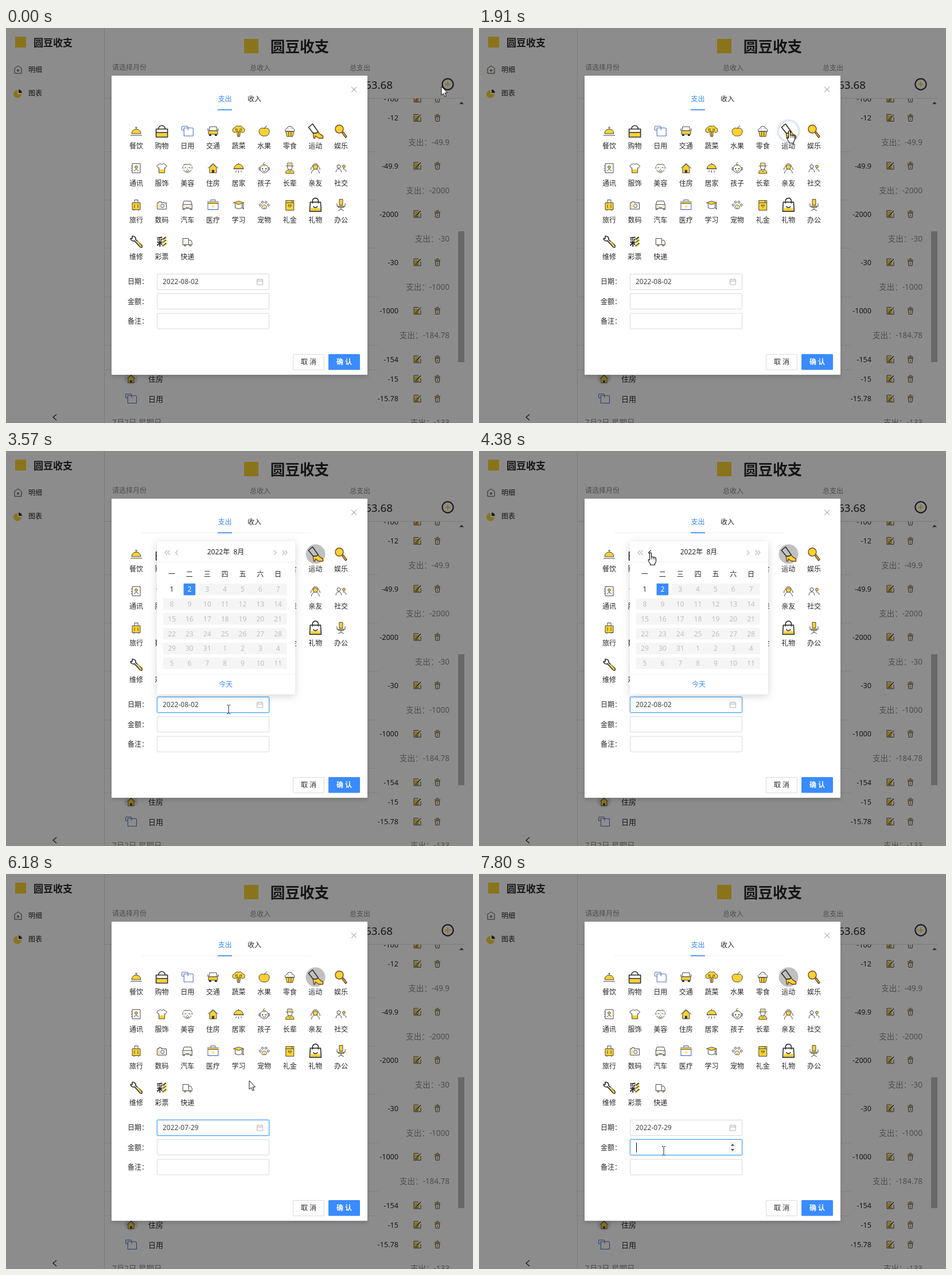
An HTML page that plays this animation: 814x688 px, repeating every 8 s.

```html
<!DOCTYPE html>
<html lang="zh-CN">
<head>
<meta charset="utf-8">
<style>
html, body { margin: 0; width: 100%; height: 100%; overflow: hidden; background: #8c8c8c; }
svg { display: block; font-family: "Noto Sans", "Noto Sans CJK SC", "Noto Sans CJK", sans-serif; }
.modal { filter: drop-shadow(0 4px 3px rgba(0,0,0,.13)); }
.popup { filter: drop-shadow(0 3px 7px rgba(0,0,0,.16)); }
</style>
</head>
<body>
<svg id="stage" width="814" height="688" viewBox="0 0 814 688"></svg>
<script>
const BLUE = '#3a8bff', INK = '#262626', PALE = '#bfbfbf', YELLOW = '#fbd231';
const LOOP = 8000;

const text = (x, y, s, size = 12, fill = INK, anchor = 'start', weight = 400) =>
  `<text x="${x}" y="${y + size * .37}" font-size="${size}" fill="${fill}" text-anchor="${anchor}" font-weight="${weight}">${s}</text>`;
const rect = (x, y, w, h, fill, more = '') =>
  `<rect x="${x}" y="${y}" width="${w}" height="${h}" fill="${fill}" ${more}/>`;
const path = (d, stroke, width = 1, fill = 'none') =>
  `<path d="${d}" stroke="${stroke}" stroke-width="${width}" fill="${fill}" stroke-linejoin="round"/>`;
const ring = (x, y, r) => `M${x - r} ${y}a${r} ${r} 0 1 0 ${2 * r} 0a${r} ${r} 0 1 0 ${-2 * r} 0`;

// The first letter of each icon part picks its style: stroke, fill, width
const styles = {
  s: ['#444', 'none', 1], t: ['#2c2c2c', 'none', 1.6], y: ['#444', YELLOW, 1],
  Y: ['none', YELLOW, 0], k: ['none', '#333', 0], b: ['#4f6fc0', '#fff', 1.1],
  o: ['#6b4322', YELLOW, 1.4], n: ['#5a4630', 'none', 1]
};
const icon = (x, y, parts, scale = 1) => `<g transform="translate(${x} ${y}) scale(${scale})">` +
  parts.split('|').map(p => {
    const [stroke, fill, width] = styles[p[0]];
    return path(p.slice(1), stroke, width, fill);
  }).join('') + '</g>';

const roll = 'bM-9-9H-1Q1-9 1-6H8Q10-6 10-4V8H-6V-2H-9Q-10-2-10-5Q-10-9-9-9Z|bM-6-2V-6H1M1-6V-2|YM-8-6h1v2h-1z';
const house = 'yM-6-1V8H6V-1L0-7Z|sM-9 0L0-8L9 0|kM-2 8V3H2V8Z';
const edit = 'YM-5-4H3V5H-5Z|sM2-6H-6V6H6V-1|sM-3 3L6-6M-4 4h5M-1 2L6-5';
const trash = 'YM-4-2H4V0H-4Z|nM-4-2H4L3 6H-3ZM-5-4H5M-2-6H2M0 1V4';

const items = [
  ['餐饮', 'yM-8 4A8 8 0 0 1 8 4Z|sM-10 7H10M0-4V-7M-2-7H2'],
  ['购物', 'YM-9 2H9V9H-9Z|tM-10-4H10V10H-10ZM-6-4Q-5-10 0-10Q5-10 6-4M-10 2H10'],
  ['日用', roll],
  ['交通', 'sM-6-8H6L7-1H-7ZM-9-5v4M9-5v4|yM-8-1H8V5H-8Z|kM-7 5h4v3h-4zM3 5h4v3H3z'],
  ['蔬菜', 'yM0-9A5 5 0 0 1 7-6A4 4 0 0 1 6 2L3 0L2 9H-2L-3 0L-6 2A4 4 0 0 1-7-6A5 5 0 0 1 0-9Z|sM-3-5Q-3-1 0 2Q3-1 3-5M0 2V9M-5-5v4M5-5v4'],
  ['水果', 'yM0-5C4-7 9-5 9 0C9 5 5 9 0 8C-5 9-9 5-9 0C-9-5-4-7 0-5Z|sM0-5Q1-8 5-10'],
  ['零食', 'yM-7 0H7L5 9H-5Z|sM-8 0Q-9-4-5-5Q-4-9 0-9Q4-9 5-5Q9-4 8 0ZM-2 0V9M2 0V9M-3-4h1M2-5h1'],
  ['运动', 'oM-4 3Q2 4 5 1Q7 5 12 7Q14 9 13 12H6L0 8L-1 12H-3Z|tM-12-7L-5-13L5 1Q2 4-4 3Z'],
  ['娱乐', 'o' + ring(-3, -4, 7) + '|oM2 3L4 1L10 9L8 11Z'],
  ['通讯', 'sM-7-8H7V8H-7Z|y' + ring(0, -2, 2.3) + '|sM-4 5Q0-1 4 5M-9-4h2M-9 0h2M-9 4h2'],
  ['服饰', 'YM-5 2H5V8H-5Z|sM-3-8Q0-5 3-8L9-4L6 0L5-1V8H-5V-1L-6 0L-9-4Z'],
  ['美容', 'sM-7-4Q-5-9 0-6Q5-9 7-4M-7 3Q0 12 7 3M-8-3V1M8-3V1M-3 4Q0 7 3 4M-5-1h3M2-1h3M-1 2h2|YM-6 1h2v1h-2zM4 1h2v1H4z'],
  ['住房', house],
  ['居家', 'yM-8 1A8 8 0 0 1 8 1Z|sM0-7V-9M-9 1H9M-4 4l-1 3M4 4l1 3M0 4v4'],
  ['孩子', 's' + ring(0, 1, 7) + 'M-7-1h-2v4h2M7-1h2v4h-2M-3 4Q0 7 3 4M0-6Q-3-9 1-10|kM-4 0h2v2h-2zM2 0h2v2H2z|YM-2-5h4v2h-4z'],
  ['长辈', 'sM-7-4H7M-4-4V-9H4V-4M-4-4V0Q0 5 4 0V-4|YM-4-7h8v2h-8z|yM-7 9V6L-3 2L0 6L3 2L7 6V9Z'],
  ['亲友', 'y' + ring(0, -2, 4) + '|sM-7 9Q-6 3-2 2M7 9Q6 3 2 2M-8 3Q-8-2-5-3A5 5 0 0 1 5-3Q8-2 8 3'],
  ['社交', 's' + ring(-4, -3, 3) + 'M-9 7Q-8 1-4 1Q0 1 1 7M3 1Q8 1 9 6|y' + ring(5, -3, 2.3)],
  ['旅行', 'yM-7-4H7V8H-7Z|sM-3-4V-9H3V-4M-3-1V5M3-1V5M-4 8v2M4 8v2'],
  ['数码', 'sM-8-4H-5V-6H-1V-4H8V7H-8ZM5-2h1' + ring(1, 1.5, 3) + '|YM-6-2h2v7h-2z'],
  ['汽车', 'sM-6-7H6L8-1V6H-8V-1ZM-8-1H8M-8 6v2h3v-2M5 6v2h3v-2M-3 4H3|YM-6 1h2v2h-2zM4 1h2v2H4z'],
  ['医疗', 'bM-9-6H9V8H-9ZM-4-6V-9H4V-6|YM-9-6H9V-3H-9ZM-3 2H3V3H-3ZM-.5 0H.5V5H-.5Z|sM-9-3H9'],
  ['学习', 'yM-9-4L0-7L9-4L0-1Z|sM-6-2V5Q0 8 6 5V-2M8-4V6|kM7 5h2v2H7z'],
  ['宠物', 'YM-2 3Q0 1 2 3L2 6H-2Z|sM-4 5Q-4 0 0 0Q4 0 4 5Q3 8 0 6Q-3 8-4 5Z' + [[-7, 0], [-3, -5], [3, -5], [7, 0]].map(p => ring(...p, 1.8)).join('')],
  ['礼金', 'yM-7-8H7V9H-7Z|sM-7-4H7M4-8v4M-3 0Q0 7 3 0Z'],
  ['礼物', 'YM-8 5H8L9 10H-9Z|tM-9-5H9L10 11H-10ZM-5-3V-8Q-4-12 0-12Q4-12 5-8V-3M-4 2Q0 7 4 2'],
  ['办公', 'yM-3-10H3V0H-3Z|yM-5 2H5V4H-5Z|sM0 4V8M-5 10L0 7L5 10M-7-3V2h2M7-3V2H5'],
  ['维修', 'tM-10-6A5 5 0 0 0-3-2L7 9Q11 11 10 6L-1-4A5 5 0 0 0-7-10V-6Z|YM1 0L3-1L9 6L8 9L6 7Z'],
  ['彩票', 'YM0 0Z'],
  ['快递', 'sM-8-6H2V5H-8ZM2-3H6L8 1V5H2|y' + ring(-4, 6, 1.5) + '|y' + ring(5, 6, 1.5)]
];

function page() {
  const grey = '#8c8c8c', black = INK;
  let s = rect(0, 0, 814, 688, '#fff');
  for (const y of [215.5, 299.5, 383.5, 468.5, 552.5, 595.5]) s += path(`M172 ${y}H648`, '#e6e6e6');
  [[123, -100], [156.5, -12], [240, -49.9], [324, -2000], [408, -30], [492.5, -1000], [577, -154], [611, -15], [645.5, -15.78]]
    .forEach(([y, n]) => s += text(684, y, n, 12.6, black, 'end') + icon(717, y, edit) + icon(752, y, trash));
  [-49.9, -2000, -30, -1000, -184.78, -133]
    .forEach((n, i) => s += text(773, i < 5 ? 199 + i * 84 : 687.5, '支出：' + n, 13.5, grey, 'end'));
  s += `<ellipse cx="218" cy="611" rx="12" ry="10" fill="#e2e7e2"/>` + icon(218, 611, house, .85) + text(248, 611, '住房', 13)
    + icon(218, 646, roll, .95) + text(248, 646, '日用', 13) + text(185, 687.5, '7月2日 星期日', 13.5, grey)
    + rect(172, 0, 642, 122, '#fff') + path('M171.5 0V688M171 122.5H800', '#dedede')
    + rect(788, 354, 11, 228, '#bcbcbc') + path('M790 132.5h8l-4-4z', 'none', 0, '#505050')
    + rect(16, 15, 19, 19, YELLOW) + text(48, 25.5, '圆豆收支', 17, black, 'start', 700)
    + rect(415, 19, 25, 25, YELLOW) + text(512, 32.5, '圆豆收支', 25.6, black, 'middle', 700)
    + icon(21, 73, 'sM-6-3L0-7L6-3V6H-6Z|y' + ring(0, 1, 1.5)) + text(39, 72.5, '明细')
    + icon(21, 114, 'YM-1-6A7 7 0 1 0 6 1H-1Z|kM1-7A7 7 0 0 1 7-1H1Z') + text(39, 114, '图表')
    + text(185, 69, '请选择月份', 12, grey) + text(425, 69.5, '总收入', 12, grey) + text(599, 69.5, '总支出', 12, grey)
    + text(674, 99, '63.68', 18.8, black, 'end')
    + path(ring(770, 98, 9.6), '#333', 2.2) + path('M770 93.500v9M765.500 98h9', YELLOW, 2)
    + path('M88 673l-6 5l6 5', '#222', 1.2);
  return s + rect(0, 0, 814, 688, 'rgba(0,0,0,.45)');
}

function modal() {
  let s = rect(184, 83, 446, 521, '#fff', 'class="modal" rx="1"')
    + path('M602 102.5l9 9m0-9l-9 9', '#858585', 1)
    + '<path id="tabLine" d="M236 142.5H531" stroke="#f0f0f0"/>'
    + text(381.5, 124, '支出', 12, BLUE, 'middle') + text(433, 124, '收入', 12, INK, 'middle') + rect(369, 141.5, 25, 1.8, BLUE)
    + '<circle id="spot" cx="539.5" cy="179.5"/>';
  items.forEach(([name, art], i) => {
    const x = 227 + i % 9 * 44.62, y = 180 + Math.floor(i / 9) * 64.2;
    s += icon(x, y, art) + text(x, y + 26, name, 12, INK, 'middle');
    if (name == '彩票') s += text(x, y, '彩', 18, '#333', 'middle', 700) + path(`M${x + 8} ${y - 7}l-6 5m7-1l-8 6m8 0l-8 6`, YELLOW, 1.8);
  });
  ['日期：', '金额：', '备注：'].forEach((label, i) => s += text(212, 442 + i * 34.4, label));
  return s + rect(500.5, 568.5, 54, 27, '#fff', 'stroke="#d9d9d9" rx="1.5"') + text(527.5, 582, '取 消', 12, INK, 'middle')
    + rect(562, 568, 55, 27.5, BLUE, 'rx="1.5"') + text(589.5, 582, '确 认', 12, '#fff', 'middle', 600);
}

// start, end, steps, control point, end point
const moves = [
  [560, 1340, 7, 600, 244, 541, 179],
  [2600, 3170, 5, 440, 590, 388, 450],
  [3710, 4380, 6, 330, 300, 299, 177],
  [4790, 5510, 6, 340, 290, 420, 350],
  [5900, 6040, 2, 422, 355, 424, 360],
  [6330, 6720, 4, 360, 400, 322, 482]
];

function pointer(t) {
  let x = 759, y = 102;
  for (const [start, end, n, cx, cy, ex, ey] of moves) {
    if (t < start) break;
    const k = Math.min(1, (Math.floor((t - start) * (n - 1) / (end - start) + .02) + 1) / n);
    const u = k * k * (3 - 2 * k), v = 1 - u;
    x = v * v * x + 2 * u * v * cx + u * u * ex;
    y = v * v * y + 2 * u * v * cy + u * u * ey;
  }
  return [x, y];
}

const cursors = {
  arrow: path('M0 0V15L3.5 12L6 17.5L8.2 16.5L6 11H10.5Z', '#111', 1, '#fff'),
  hand: path('M-1.5 1Q0-.8 1.5 1V8Q3 6.5 4.5 8Q6 7 7.2 8.6Q9 8 9.5 10V15Q9 18 7.5 19V21.5H-.5V19.5Q-3.5 16-4 13Q-4 11-1.5 13Z', '#111', 1.1, '#fff')
    + path('M1.5 8v4M4.5 8v4M7.2 9v3', '#111', .8),
  beam: path('M-3-7.500H-1L0-6.500L1-7.500H3M0-6.500V6.500M-3 7.500H-1L0 6.500L1 7.500H3', '#222', 1)
};

const iso = d => [d.getFullYear(), d.getMonth() + 1, d.getDate()].map(n => String(n).padStart(2, '0')).join('-');
const today = new Date(2022, 7, 2);
const dayAt = (month, i) => new Date(2022, month, (month == 7 ? 1 : -3) + i);

function calendar(month, hover, picked, overPrev) {
  let s = rect(263, 157.5, 241, 266.5, '#fff', 'class="popup" rx="1"')
    + path('M263 193.5H504M263 389.5H504', '#f0f0f0')
    + path('M281 173l-4 4l4 4m4.5-8l-4 4l4 4M467 173l4 4l-4 4M481.5 173l4 4l-4 4m4.5-8l4 4l-4 4', '#b8b8b8', 1.1)
    + path('M299.5 173l-4 4l4 4', overPrev ? '#222' : '#b8b8b8', 1.2)
    + text(383, 176, `2022年&#160; ${month + 1}月`, 12, INK, 'middle', 500)
    + text(383, 406.5, '今天', 12, BLUE, 'middle');
  [...'一二三四五六日'].forEach((d, c) => s += text(289 + c * 30.85, 215, d, 12, INK, 'middle'));
  for (let i = 0; i < 42; i++) {
    const d = dayAt(month, i), x = 289 + i % 7 * 30.85, y = 241 + Math.floor(i / 7) * 25.75;
    const off = d > today, inside = d.getMonth() == month, on = inside && iso(d) == picked;
    if (off) s += rect(x - 15.4, y - 10, 31, 20, '#f5f5f5');
    else if (on || i == hover) s += rect(x - 10.3, y - 10.3, 20.6, 20.6, on ? BLUE : '#f2f2f2', 'rx="1"');
    s += text(x, y, d.getDate(), 12, on ? '#fff' : off || !inside ? PALE : INK, 'middle');
  }
  return s;
}

function field(y, focus, hover) {
  const glow = focus ? rect(262.5, y - 1, 197, 29, 'none', 'stroke="#1890ff" stroke-opacity=".22" rx="2"') : '';
  return glow + rect(263.5, y, 195, 27, '#fff', `stroke="${focus ? '#45a0fa' : hover ? '#8fbcec' : '#d9d9d9'}" rx="1.5"`);
}

function live(t) {
  const [x, y] = pointer(t);
  const over = top => x > 263 && x < 459 && y >= top && y <= top + 27;
  const open = t < 3430 ? 0 : t < 3570 ? .6 : t < 5900 ? 1 : t < 6040 ? .45 : 0;
  const month = t < 4520 ? 7 : 6, picked = t < 5780 ? '2022-08-02' : '2022-07-29';
  const overPrev = open && Math.hypot(x - 299, y - 178) < 8;

  let hover = -1;
  if (open == 1 && month == 6) {
    const c = Math.floor((x - 273.6) / 30.85), r = Math.floor((y - 228.5) / 25.75);
    if (c >= 0 && c < 7 && r >= 0 && r < 6 && dayAt(6, r * 7 + c) <= today) hover = r * 7 + c;
  }
  const preview = hover >= 0 && t < 5780;
  const amountFocus = t >= 6860, amountHover = over(462.5);

  let s = field(428.5, t >= 3290 && !amountFocus, over(428.5))
    + field(462.5, amountFocus, amountHover) + field(497, false, over(497))
    + text(273, 442, preview ? iso(dayAt(6, hover)) : picked, 12, preview ? PALE : '#444')
    + path('M437.5 438h10v9h-10zM437.5 441h10M440 436.5v3M445 436.5v3', '#b5b5b5');
  if (amountHover) s += rect(436, 467, 12, 18, '#f2f2f2') + path('M439 473.5h6l-3-3.5zM439 479h6l-3 3.5z', 'none', 0, '#444');
  if (amountFocus && (t < 7240 || t >= 7800)) s += path('M274.5 468V485', '#000');
  if (open) s += `<g opacity="${open}" transform="translate(0 ${424 * (1 - open) * .2}) scale(1 ${.8 + open * .2})">`
    + calendar(month, hover, picked, overPrev) + '</g>';

  const onDate = open == 1 && month == 6 && t < 5900, onIcon = t >= 1340 && t < 2740;
  const onField = over(428.5) || !open && (over(462.5) || over(497));
  const kind = onField ? 'beam' : onDate || overPrev || onIcon ? 'hand' : 'arrow';
  return s + `<g transform="translate(${x.toFixed(1)} ${y.toFixed(1)})">${cursors[kind]}</g>`;
}

const byId = id => document.getElementById(id);
byId('stage').innerHTML = page() + modal() + '<g id="live"></g>';

let shown = '';
function draw() {
  const t = performance.now() % LOOP;
  const spot = byId('spot'), wave = t >= 1910 && t < 2060;
  spot.setAttribute('r', wave ? 18.5 : 17);
  spot.setAttribute('fill', t >= 2060 ? '#c1c0c0' : 'none');
  spot.setAttribute('stroke', wave ? '#dce7f8' : 'none');
  spot.setAttribute('stroke-width', 3.5);
  byId('tabLine').setAttribute('opacity', t >= 3430 ? 1 : 0);
  const next = live(t);
  if (next != shown) byId('live').innerHTML = shown = next;
  requestAnimationFrame(draw);
}
draw();
</script>
</body>
</html>
```
